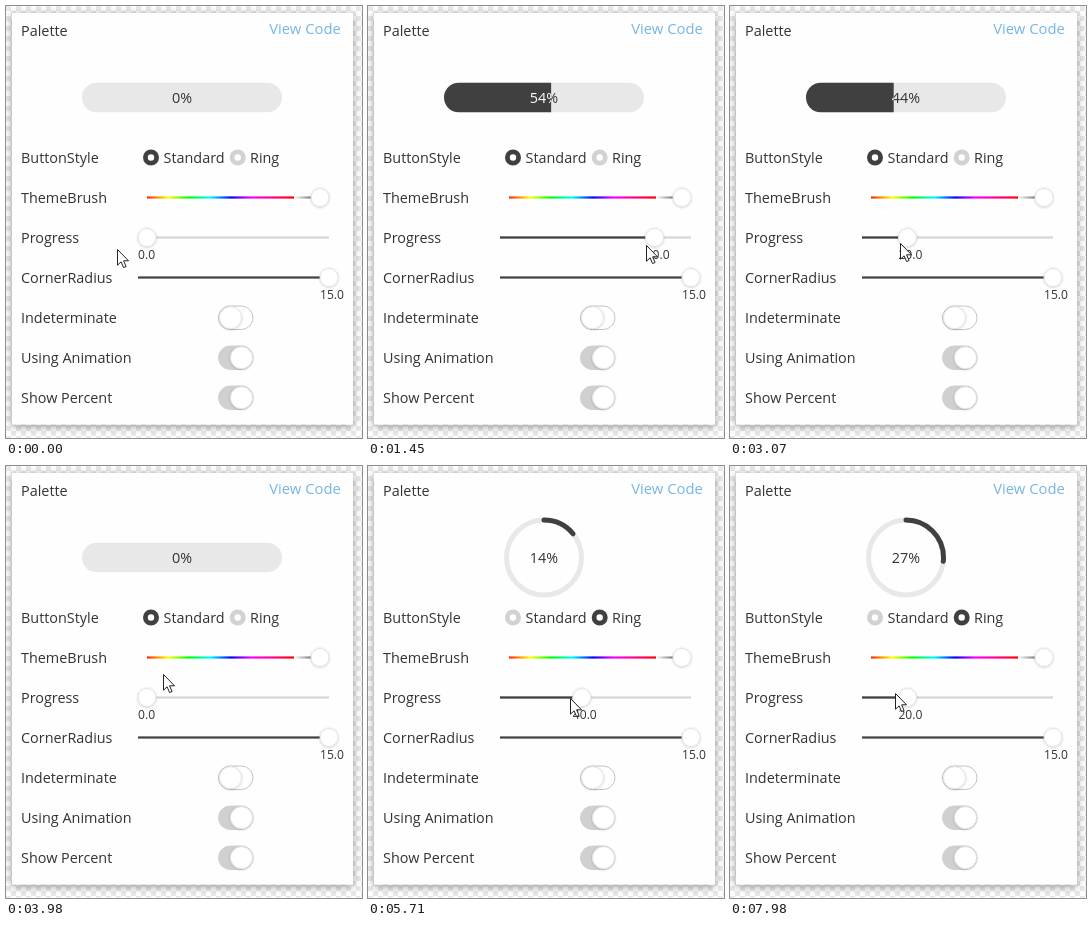
Recreate the animation shown at these times as an HTML page. Size 356x432 px, loop 8000 ms.

```html
<!DOCTYPE html>
<html lang="en">
<head>
<meta charset="utf-8">
<title>Palette</title>
<style>
html, body { margin: 0; width: 100%; height: 100%; overflow: hidden; }
svg { display: block; width: 356px; height: 432px; font: 14.4px "Open Sans", "Noto Sans", sans-serif; fill: #333; }
.small { font-size: 12.1px; }
.link { font-size: 14.8px; fill: #76b6e5; }
.mid { text-anchor: middle; }
.dark { fill: #404040; }
.light { fill: #e8e8e8; }
.track { fill: #d6d6d6; }
.thumb { fill: #fff; stroke: #e4e4e4; filter: url(#soft); }
.radio { fill: #fff; stroke-width: 4.8; }
.arc { fill: none; stroke-width: 5; }
</style>
</head>
<body>
<svg viewBox="0 0 356 432">
  <defs>
    <pattern id="checks" width="10" height="10" patternUnits="userSpaceOnUse">
      <path d="M0 0h10v10H0z" fill="#fff"/>
      <path d="M0 0h5v5H0zM5 5h5v5H5z" fill="#e9e9e9"/>
    </pattern>
    <linearGradient id="hues"></linearGradient>
    <linearGradient id="grays"><stop stop-color="#f4f4f4"/><stop offset="1" stop-color="#777"/></linearGradient>
    <filter id="soft" x="-30%" y="-30%" width="160%" height="160%">
      <feDropShadow dx="0" dy=".5" stdDeviation=".9" flood-opacity=".22"/>
    </filter>
    <filter id="drop" x="-6%" y="-6%" width="112%" height="114%">
      <feDropShadow dx="0" dy="2" stdDeviation="4" flood-opacity=".4"/>
    </filter>
    <clipPath id="done"><rect id="doneBox" x="76" y="76" height="32"/></clipPath>
  </defs>
  <rect width="356" height="432" fill="url(#checks)"/>
  <rect x="6" y="7" width="341" height="411.5" fill="#fefefe" filter="url(#drop)"/>
  <g id="labels"></g>
  <text class="link" x="263.3" y="28">View Code</text>

  <g id="bar">
    <rect class="light" x="76" y="76.7" width="200" height="29.6" rx="14.8"/>
    <text class="mid pct" x="176" y="97"></text>
    <g clip-path="url(#done)">
      <rect class="dark" x="76" y="76.7" width="200" height="29.6" rx="14.8"/>
      <text class="mid pct" x="176" y="97" fill="#fff"></text>
    </g>
  </g>
  <g id="ring">
    <circle class="arc" cx="176" cy="91.5" r="37.5" stroke="#e8e8e8"/>
    <circle class="arc" id="arc" cx="176" cy="91.5" r="37.5" stroke="#404040" stroke-linecap="round"
      pathLength="100" transform="rotate(-90 176 91.5)"/>
    <text class="mid pct" x="176" y="97"></text>
  </g>

  <circle class="radio" id="standard" cx="145" cy="151.5" r="5.6"/>
  <text x="157.5" y="157">Standard</text>
  <circle class="radio" id="ringed" cx="231.7" cy="151.5" r="5.6"/>
  <text x="244" y="157">Ring</text>

  <rect x="141" y="190.4" width="147" height="2.2" fill="url(#hues)"/>
  <rect x="289" y="190.4" width="17" height="2.2" fill="url(#grays)"/>
  <circle class="thumb" cx="314" cy="191.5" r="9"/>

  <rect class="track" x="132" y="230.4" width="191" height="2.2"/>
  <rect class="dark" id="level" x="132" y="230.4" height="2.2"/>
  <circle class="thumb" id="knob" cy="231.5" r="9"/>
  <text class="small" id="value" y="253"></text>

  <rect class="dark" x="132" y="270.4" width="191" height="2.2"/>
  <circle class="thumb" cx="323" cy="271.5" r="9"/>
  <text class="small" x="314" y="293">15.0</text>

  <g id="switches"></g>
  <path id="cursor" d="M.5.5V16.2L4.1 12.8 6.6 18.6 9.1 17.5 6.6 11.8H11.5Z" fill="#fff" stroke="#222" stroke-linejoin="round"/>
</svg>
<script>
const $ = id => document.getElementById(id);
const set = (id, attrs) => { for (const k in attrs) $(id).setAttribute(k, attrs[k]); };

$('hues').innerHTML = ['#f20', '#ff0', '#0f0', '#0ff', '#00f', '#f0f', '#f08', '#f00']
  .map((c, i) => `<stop offset="${i / 7}" stop-color="${c}"/>`).join('');
$('labels').innerHTML = ['ButtonStyle', 'ThemeBrush', 'Progress', 'CornerRadius', 'Indeterminate', 'Using Animation', 'Show Percent']
  .map((s, i) => `<text x="15" y="${157 + 40 * i}">${s}</text>`).join('') + '<text x="15" y="30">Palette</text>';
$('switches').innerHTML = [false, true, true].map((on, i) => {
  const y = 311.5 + 40 * i;
  return `<rect x="212.5" y="${y - 11.5}" width="34.5" height="23.5" rx="11.75" fill="${on ? '#d0d0d0' : '#fff'}" stroke="${on ? '#d0d0d0' : '#c4c4c4'}"/>
    <circle class="thumb" cx="${on ? 235.5 : 224.5}" cy="${y + .2}" r="11"/>`;
}).join('');

const LOOP = 8000, LAG = 195, RING_AT = 4610;
// Pointer moves: start, end, x, y; it rests between them
const moves = [
  [0, 0, 111, 243], [170, 710, 138, 231],
  [890, 1450, 278, 239], [1450, 1740, 307, 243], [2430, 3250, 132, 235], [3250, 3690, 121, 235],
  [3870, 3980, 157, 208], [3980, 4460, 247, 155], [4610, 5220, 138, 234],
  [5430, 5710, 202, 232], [5710, 6600, 316, 227], [7160, 7780, 181, 227], [7780, LOOP - 20, 165, 227]
];

function pointer(t) {
  let x = 0, y = 0;
  for (const [from, to, nx, ny] of moves) {
    if (t < from) break;
    const p = Math.min(1, (t - from) / (to - from || 1));
    x += (nx - x) * p;
    y += (ny - y) * p;
    if (!to) [x, y] = [nx, ny];
  }
  return [x, y];
}

// Percentage under the pointer while it drags the knob
function dragged(t) {
  const held = t > 890 && t < 3250 || t > 5430;
  return held ? Math.max(0, Math.min(100, (pointer(t)[0] - 132) / 1.82)) : 0;
}

function draw(t) {
  const [x, y] = pointer(t);
  const value = Math.round(dragged(t) / 10) * 10;
  const pct = dragged(t - LAG);   // the display trails the knob
  const knob = 141 + 1.82 * value, ring = t >= RING_AT;

  set('cursor', { transform: `translate(${Math.round(x)} ${Math.round(y)})` });
  set('knob', { cx: knob });
  set('level', { width: knob - 132 });
  set('value', { x: knob - 9 });
  $('value').textContent = value.toFixed(1);

  set('bar', { display: ring ? 'none' : 'inline' });
  set('ring', { display: ring ? 'inline' : 'none' });
  set('standard', { stroke: ring ? '#d2d2d2' : '#404040' });
  set('ringed', { stroke: ring ? '#404040' : '#d2d2d2' });
  set('doneBox', { width: 2 * pct });
  set('arc', { 'stroke-dasharray': `${pct} 200`, visibility: pct > 0 ? 'visible' : 'hidden' });
  for (const el of document.querySelectorAll('.pct')) el.textContent = Math.round(pct) + '%';
}

const start = performance.now();
(function tick() {
  draw((performance.now() - start) % LOOP);
  requestAnimationFrame(tick);
})();
</script>
</body>
</html>
```
